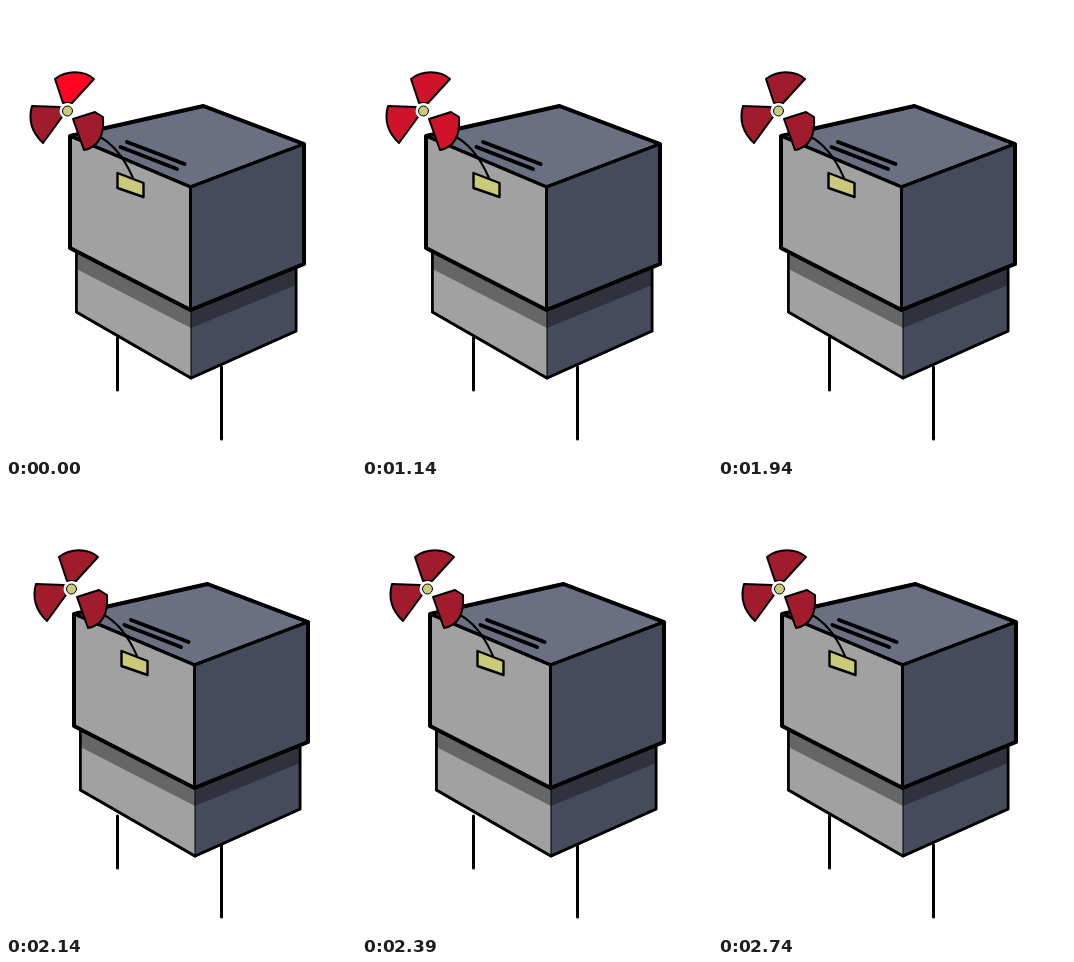
An HTML page with a canvas for the animation above (2790 ms loop, 350 by 450 pixels).

```html
<!DOCTYPE html>
<html lang="en">
<head>
<meta charset="utf-8">
<title>Rattling box</title>
<style>
  html, body { margin: 0; width: 100%; height: 100%; overflow: hidden; background: #fff; }
  canvas { display: block; }
</style>
</head>
<body>
<canvas id="stage" width="350" height="450"></canvas>
<script>
const ctx = document.getElementById('stage').getContext('2d');
const LOOP = 2790;

const DARK = '#a01c2c', MID = '#d0132a', BRIGHT = '#ff0522';
const BRASS = '#cbc97a', GLOW = '#f6eba0';
const LIGHT = '#a1a1a1', SHADE = '#464b5c';

const BLADES = [
  'M57 97 L49 73 C60 64 78 64 88 73 L66 97 Z',
  'M54 101 L26 100 Q20 121 37 137 L56 111 Z',
  'M67 113 L89 106 L97 111 Q99 140 78 144 Z'
].map(d => new Path2D(d));

const BURSTS = [
  { from: 1640, step: 100, size: 1 },
  { from: 2090, step: 50, size: 4 },
  { from: 2340, step: 50, size: 4 }
];

// Each burst swings right, centre, left, centre
function shakeAt(t) {
  const burst = BURSTS.filter(b => t >= b.from).pop();
  if (!burst) return 0;
  const step = Math.floor((t - burst.from) / burst.step);
  return Math.round(burst.size * Math.sin(step * Math.PI / 2));
}

function lampsAt(t) {
  const blades = [DARK, DARK, DARK];
  if (t < 630) blades[Math.floor(t / 210)] = BRIGHT;
  else if (t >= 840 && t < 1140) blades.fill(BRIGHT);
  else if (t >= 1140 && t < 1440) blades.fill(MID);
  return { blades, hub: t >= 630 && t < 840 ? GLOW : BRASS };
}

function poly(points, fill, width) {
  ctx.beginPath();
  points.forEach(([x, y]) => ctx.lineTo(x, y));
  ctx.closePath();
  if (fill) {
    ctx.fillStyle = fill;
    ctx.fill();
  }
  if (width) {
    ctx.lineWidth = width;
    ctx.stroke();
  }
}

// A wall between two upright edges, each given as [x, top, bottom]
function wall([x1, top1, low1], [x2, top2, low2], fill, width) {
  poly([[x1, top1], [x2, top2], [x2, low2], [x1, low1]], fill, width);
}

function line(x1, y1, x2, y2, width) {
  ctx.lineWidth = width;
  ctx.beginPath();
  ctx.moveTo(x1, y1);
  ctx.lineTo(x2, y2);
  ctx.stroke();
}

function disc(x, y, r, fill) {
  ctx.beginPath();
  ctx.arc(x, y, r, 0, Math.PI * 2);
  ctx.fillStyle = fill;
  ctx.fill();
}

function shifted(dx, draw) {
  ctx.save();
  ctx.translate(dx, 0);
  draw();
  ctx.restore();
}

function drawLegs() {
  line(111.5, 332, 111.5, 384, 3);
  line(215.5, 361, 215.5, 433, 3);
}

function drawBase() {
  const left = [70.5, 240, 306], mid = [185, 300, 372], right = [290, 255, 325];
  const shadow = ([x, top], depth) => [x, top, top + depth];
  wall(left, mid, LIGHT, 2.6);
  wall(mid, right, SHADE, 2.6);
  wall(left, mid, LIGHT);
  wall(mid, right, SHADE);
  wall(shadow(left, 23), shadow(mid, 22), '#666666');
  wall(shadow(mid, 22), shadow(right, 24), '#2f313d');
  line(185, 300, 185, 372, 1);
  line(70.5, 240, 70.5, 306, 2.6);
  line(70.5, 306, 185, 372, 2.6);
  line(185, 372, 290, 325, 2.6);
  line(290, 325, 290, 255, 2.6);
}

function drawLid() {
  const left = [64, 130, 242], mid = [184.5, 181, 304], right = [298, 138, 258];
  const back = [197.5, 100];
  const top = ([x, y]) => [x, y], low = ([x, , y]) => [x, y];
  poly([top(left), back, top(right), top(mid)], '#6a6f81', 3);
  wall(left, mid, LIGHT, 3);
  wall(mid, right, SHADE, 3);
  poly([top(left), back, top(right), low(right), low(mid), low(left)], null, 4);
  line(121, 136, 178.5, 158, 4);
  line(114.5, 141, 171, 163, 4);
  wall([111.5, 167, 182], [137.5, 177, 191], BRASS, 2.4);
}

function drawRotor({ blades, hub }) {
  ctx.lineWidth = 2;
  ctx.stroke(new Path2D('M92 130 Q113 140 127 172'));
  BLADES.forEach((blade, i) => {
    ctx.fillStyle = blades[i];
    ctx.fill(blade);
    ctx.stroke(blade);
  });
  disc(61.5, 105, 8, '#fff');
  disc(61.5, 105, 5, hub);
  ctx.lineWidth = 1;
  ctx.stroke();
}

function render(t) {
  const dx = shakeAt(t);
  ctx.fillStyle = '#fff';
  ctx.fillRect(0, 0, 350, 450);
  ctx.strokeStyle = '#000';
  ctx.lineJoin = ctx.lineCap = 'round';
  drawLegs();
  // A gentle shake rattles only the lid
  shifted(Math.abs(dx) > 1 ? dx : 0, drawBase);
  shifted(dx, () => {
    drawLid();
    drawRotor(lampsAt(t));
  });
}

const begin = performance.now();
function tick() {
  render((performance.now() - begin) % LOOP);
  requestAnimationFrame(tick);
}
tick();
</script>
</body>
</html>
```
